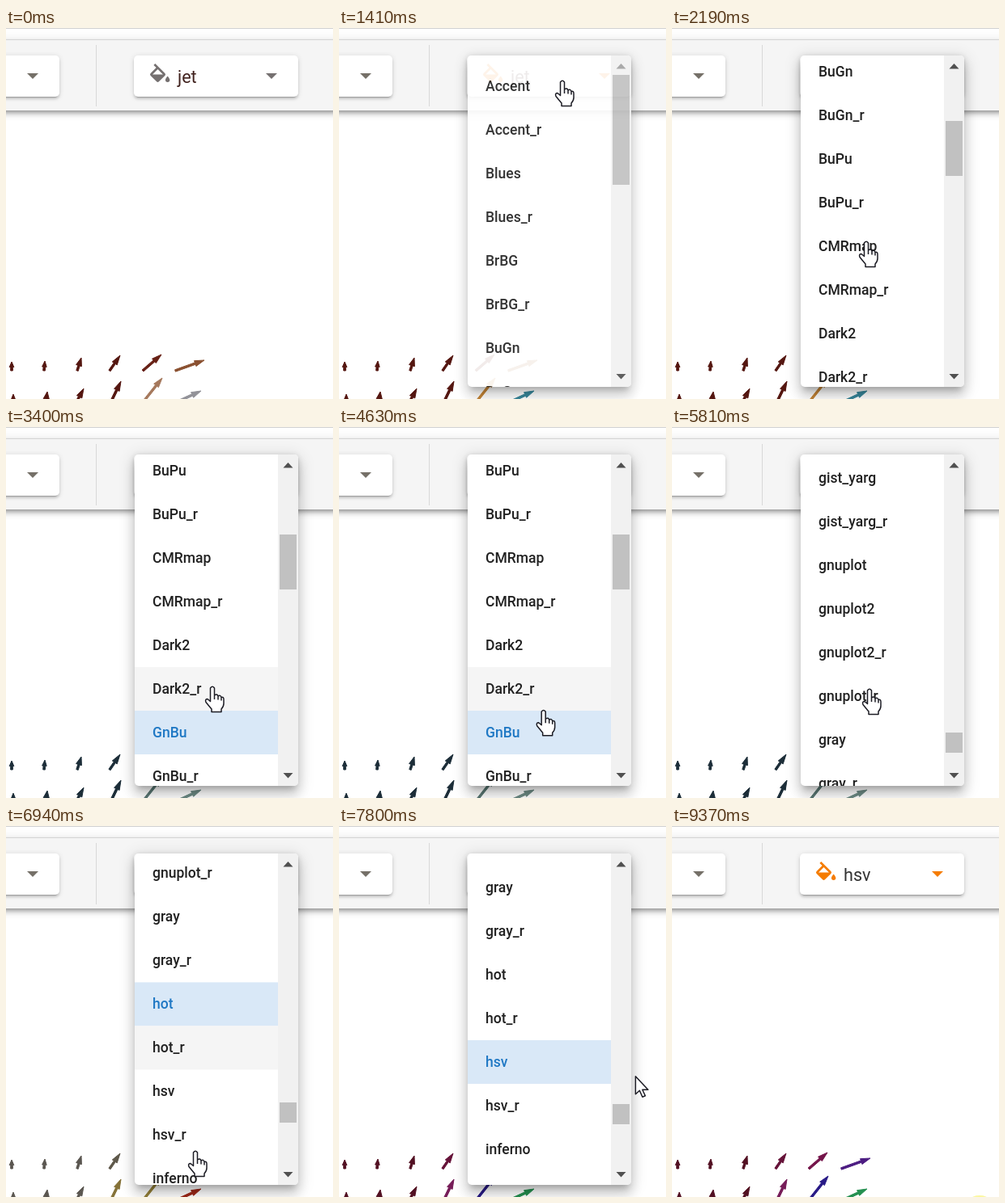
An HTML page for the animation above (9470 ms loop, 404x459 px).

```html
<!DOCTYPE html>
<html lang="en">
<head>
<meta charset="utf-8">
<title>Colour map menu</title>
<style>
html, body { margin: 0; width: 100%; height: 100%; overflow: hidden; background: #fff; }
body { position: relative; font-family: Roboto, sans-serif; }
svg { position: absolute; left: 0; top: 0; overflow: hidden; }
#bar { position: absolute; left: -10px; top: 14px; width: 424px; height: 88px; box-sizing: border-box;
  background: #f5f5f5; border-top: 1px solid #d4d4d4;
  box-shadow: 0 3px 5px -1px rgba(0,0,0,.3), 0 5px 7px rgba(0,0,0,.14), 0 1px 13px rgba(0,0,0,.1); }
#top { position: absolute; left: 0; top: 0; width: 404px; height: 1px; background: #d0d0d0; }
#split { position: absolute; left: 111px; top: 21px; width: 1px; height: 76px; background: #d8d8d8; }
.box { position: absolute; top: 34px; height: 51px; background: #fff; border-radius: 5px;
  box-shadow: 0 4px 1px -3px rgba(0,0,0,.2), 0 3px 3px rgba(0,0,0,.14), 0 1px 7px rgba(0,0,0,.12); }
#menu { position: absolute; left: 159px; top: 34px; width: 202px; height: 410px; overflow: hidden;
  background: #fff; border-radius: 5px;
  box-shadow: 0 7px 7px -4px rgba(0,0,0,.2), 0 11px 14px 1px rgba(0,0,0,.14), 0 4px 19px 3px rgba(0,0,0,.12); }
#list { position: absolute; left: 0; top: 11px; width: 177px; }
#list div { height: 54px; line-height: 54px; padding-left: 22px; font-size: 17.55px; font-weight: 500;
  color: #212121; white-space: nowrap; }
#list .hover { background: #f5f5f5; }
#list .on { background: #d9e8f7; color: #1f78c4; }
#track { position: absolute; left: 177px; top: 0; width: 25px; height: 410px; background: #f1f1f1; }
#thumb { position: absolute; left: 2px; width: 21px; background: #c1c1c1; }
</style>
</head>
<body>
<div id="bar"></div>
<div id="top"></div>
<div id="split"></div>
<div class="box" style="left:-40px;width:106px"></div>
<div class="box" style="left:158px;width:203px"></div>
<svg width="404" height="459">
  <g id="arrows" stroke-linejoin="round"></g>
  <path fill="#757068" d="M26 56h14l-7 7z"/>
  <g id="accent">
    <path d="M321 56h14l-7 7z"/>
    <path transform="translate(174 44) scale(1.35)" d="M19 11.5S17 13.67 17 15a2 2 0 0 0 4 0c0-1.33-2-3.5-2-3.5M5.21 10 10 5.21 14.79 10M16.56 8.94 7.62 0 6.21 1.41 8.59 3.79 3.44 8.94a1.5 1.5 0 0 0 0 2.12l5.5 5.5a1.5 1.5 0 0 0 2.12 0l5.5-5.5a1.5 1.5 0 0 0 0-2.12z"/>
  </g>
  <text id="label" x="212" y="68" font-size="21.6" font-family="Roboto, sans-serif"></text>
  <ellipse id="glow" cx="380" cy="462" rx="11" ry="5" fill="#fbf7a0"/>
</svg>
<div id="menu">
  <div id="list"></div>
  <div id="track">
    <div id="thumb"></div>
    <svg width="25" height="410"><path id="up" d="M6.500 16.500h12l-6-6.500z"/><path fill="#505050" d="M6.500 394h12l-6 6.500z"/></svg>
  </div>
</div>
<svg width="404" height="459">
  <g id="cursor" fill="#fff" stroke="#1c1c24" stroke-width="1.5" stroke-linejoin="round">
    <path id="hand" d="M-2.500 2Q0-1.500 2.500 2V11Q6 8.500 7 12Q10 10 11 13.500Q14 12.500 14 16V21Q14 25 11 28V31.500H-1V28L-8 19.500Q-9.500 15.500-6 15.500L-2.500 18.500ZM2.500 11v5M7 12v4.500M11 13.500v4"/>
    <path id="pointer" d="M0 0V22L5 17.500L8.500 25.500L12 24L8.500 16.500H15.500Z"/>
  </g>
</svg>
<script>
const LOOP = 9470, ROW = 54, VIEW = 410, TRACK = 363;
const $ = id => document.getElementById(id);

const bases = `Accent Blues BrBG BuGn BuPu CMRmap Dark2 GnBu Greens Greys OrRd Oranges PRGn Paired
  Pastel1 Pastel2 PiYG PuBu PuBuGn PuOr PuRd Purples RdBu RdGy RdPu RdYlBu RdYlGn Reds Set1 Set2 Set3
  Spectral Wistia YlGn YlGnBu YlOrBr YlOrRd afmhot autumn binary bone brg bwr cividis cool coolwarm
  copper cubehelix flag gist_earth gist_gray gist_heat gist_ncar gist_rainbow gist_stern gist_yarg
  gnuplot gnuplot2 gray hot hsv inferno jet magma nipy_spectral ocean pink plasma prism rainbow`.split(/\s+/);
const names = bases.flatMap(n => [n, n + '_r']).sort();
const rows = names.map(n => {
  const el = document.createElement('div');
  el.textContent = n;
  return $('list').appendChild(el);
});

// tail x, tail y, tip x, tip y
const vectors = [
  [7, 424, 7, 413], [47, 424, 48, 412], [88, 424, 93, 408], [128, 424, 141, 405], [169, 424, 192, 404], [209, 424, 245, 411],
  [9, 465, 9, 453], [49, 465, 51, 450], [87, 463, 96, 446], [130, 462, 142, 437], [170, 462, 193, 433], [204, 466, 241, 449]
];
const arrows = vectors.map(([x, y, tx, ty]) => {
  const len = Math.hypot(tx - x, ty - y), ux = (tx - x) / len, uy = (ty - y) / len;
  const head = Math.min(12, len * .6), w = len < 14 ? 2.8 : 3.6;
  const pt = (along, side) => `${(x + ux * along - uy * side).toFixed(1)} ${(y + uy * along + ux * side).toFixed(1)}`;
  const neck = len - head;
  const el = document.createElementNS('http://www.w3.org/2000/svg', 'path');
  el.setAttribute('d', 'M' + [pt(0, 1.3), pt(neck, 1.3), pt(neck, w), pt(len, 0), pt(neck, -w), pt(neck, -1.3), pt(0, -1.3)].join('L') + 'Z');
  return $('arrows').appendChild(el);
});

// one colour per arrow; a short row repeats its first colour for the leading arrows
const palette = (base, a, b) => [...Array(6 - a.length).fill(base), ...a, ...Array(6 - b.length).fill(base), ...b];
const palettes = {
  idle: palette('#541610', ['#672015', '#8a5030'], ['#a5785c', '#929298']),
  jet: palette('#541610', ['#6b2010', '#a8642c'], ['#c48436', '#36869a']),
  GnBu: palette('#1c2d38', ['#2c444c', '#54706e'], ['#587672', '#6c8a84']),
  hot: palette('#5a5650', ['#5e584a', '#77703c', '#8c3020'], ['#857238', '#948038', '#9e2818']),
  hsv: palette('#521022', ['#651238', '#74144a', '#4c1c82'], ['#761c58', '#281a86', '#249050'])
};

// [time, value]
const picked = [[0, 'jet'], [3000, 'GnBu'], [6230, 'hot'], [7490, 'hsv']];
const tint = [[0, 'idle'], [620, 'jet'], [3120, 'GnBu'], [6320, 'hot'], [7600, 'hsv']];
const hovered = [[0, ''], [2390, 'Dark2'], [2830, 'Dark2_r'], [2920, 'GnBu'], [3250, 'Dark2_r'], [4660, 'GnBu'],
  [5400, ''], [6000, 'hot'], [6620, 'hot_r'], [7200, 'hsv']];
const scroll = [[1560, 0], [2390, 450], [5060, 450], [5160, 625], [5250, 702], [5450, 702], [5810, 5948], [5960, 6104],
  [6850, 6104], [6940, 6223], [7000, 6260]];
// [time, x, y]
const moves = [[590, 352, 462], [1200, 276, 65], [1560, 276, 65], [1950, 240, 264], [2750, 240, 264], [2960, 250, 368],
  [3130, 250, 368], [3400, 255, 321], [3870, 255, 321], [3960, 256, 329], [4550, 256, 329], [4760, 246, 393],
  [5450, 246, 393], [5780, 244, 324], [6430, 244, 324], [6780, 234, 402], [7030, 234, 402], [7350, 236, 290],
  [7530, 236, 290], [7820, 368, 310], [7960, 368, 320], [8380, 370, 470]];

const step = (table, t) => table.reduce((v, k) => k[0] <= t ? k[1] : v, table[0][1]);
const linear = p => p, smooth = p => p * p * (3 - 2 * p);
const out = p => 1 - (1 - p) ** 3;
const clamp = p => Math.min(1, Math.max(0, p));
function tween(table, t, ease, col = 1) {
  const i = table.findIndex(k => k[0] > t);
  if (i < 0) return table[table.length - 1][col];
  if (!i) return table[0][col];
  const a = table[i - 1], b = table[i];
  return a[col] + (b[col] - a[col]) * ease((t - a[0]) / (b[0] - a[0]));
}

function drawMenu(t) {
  const shown = out(clamp((t - 1260) / 270)) * (1 - smooth(clamp((t - 7850) / 270)));
  $('menu').style.opacity = shown;
  $('menu').style.visibility = shown > 0 ? 'visible' : 'hidden';
  const s = tween(scroll, t, linear);
  $('list').style.transform = `translateY(${-s}px)`;

  // more rows load as the list scrolls, so the thumb shrinks
  const loaded = 20 * (1 + Math.max(0, Math.ceil((s - 300) / 1130)));
  const full = loaded * ROW + 18, size = VIEW * TRACK / full;
  $('thumb').style.top = 24 + s / (full - VIEW) * (TRACK - Math.max(36, size)) + 'px';
  $('thumb').style.height = Math.max(25, size) + 'px';
  $('up').setAttribute('fill', s > 0 ? '#505050' : '#a3a3a3');

  const on = step(picked, t), hover = step(hovered, t);
  rows.forEach((el, i) => {
    el.className = names[i] === on ? 'on' : names[i] === hover ? 'hover' : '';
  });
  $('label').textContent = on;
  $('label').setAttribute('fill', on === 'jet' ? '#40211d' : '#333');
  $('accent').setAttribute('fill', t < 1230 ? '#757070' : '#f57c00');
  return shown;
}

function drawCursor(t, shown) {
  const x = tween(moves, t, smooth), y = tween(moves, t, smooth, 2);
  const over = x > 158 && x < 361 && (y < 86 || shown > .5);
  $('cursor').setAttribute('transform', `translate(${x} ${y})`);
  $('cursor').style.display = t < 590 || t > 8380 ? 'none' : '';
  $('hand').style.display = over ? '' : 'none';
  $('pointer').style.display = over ? 'none' : '';
}

function draw() {
  const t = performance.now() % LOOP;
  drawCursor(t, drawMenu(t));
  const colours = palettes[step(tint, t)];
  arrows.forEach((el, i) => {
    el.setAttribute('fill', colours[i]);
    el.setAttribute('stroke', colours[i]);
  });
  $('glow').style.display = t >= 9370 ? '' : 'none';
  requestAnimationFrame(draw);
}
draw();
</script>
</body>
</html>
```
